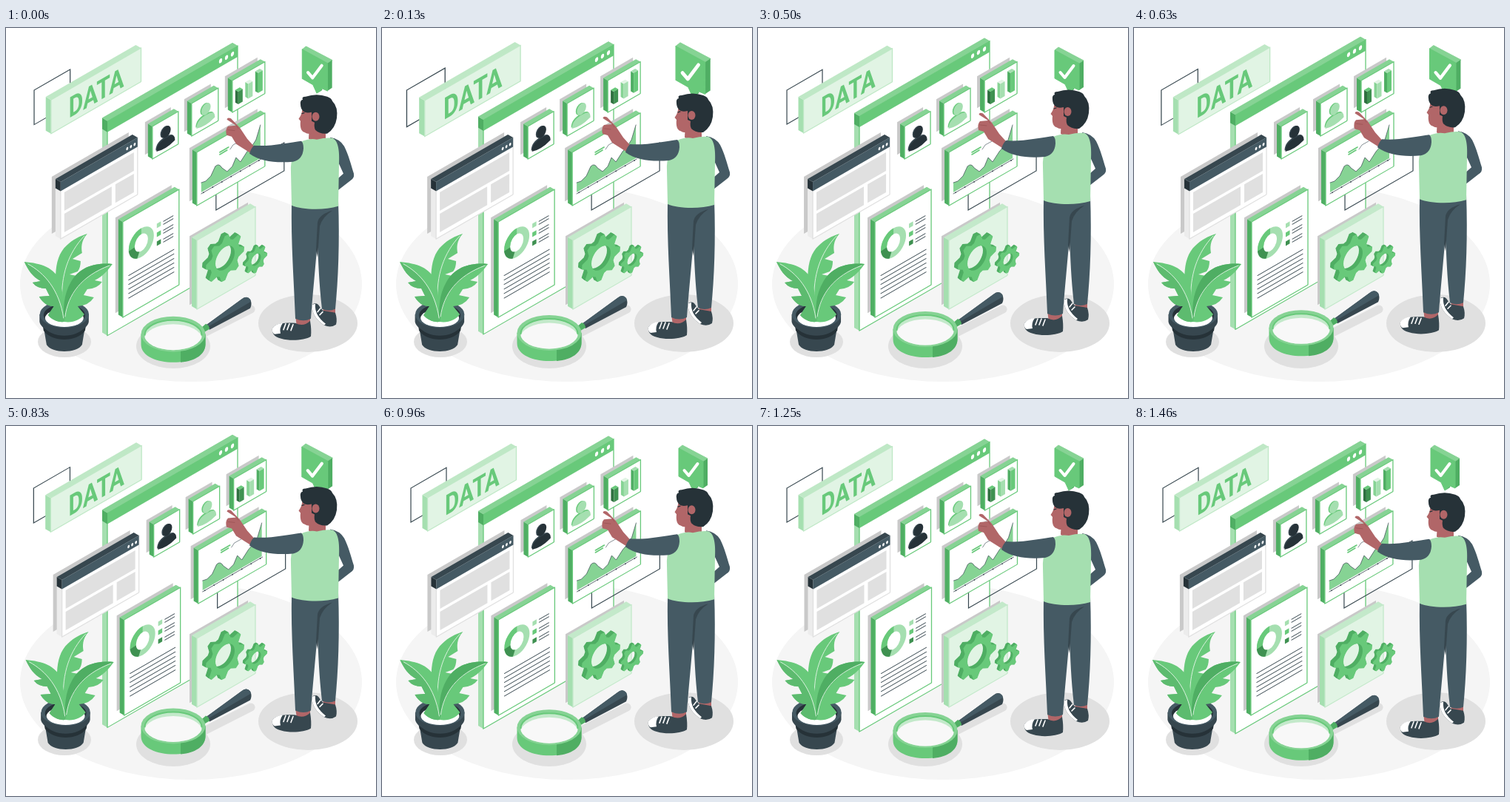
An HTML page for the animation above (1500 ms loop, 500 by 500 pixels).

```html
<!DOCTYPE html>
<html>
<head>
<meta charset="utf-8">
<style>
html, body { margin: 0; width: 100%; height: 100%; overflow: hidden; background: #fff }
svg { display: block; width: 100vw; height: 100vh }
text { font: bold 38px Roboto, sans-serif }
</style>
</head>
<body>
<svg id="stage" viewBox="0 0 500 500"></svg>
<script>
const green = '#68c97a', light = '#a5dfb0', pale = '#e1f4e4', mid = '#86d394', deep = '#4fae63', dark = '#3f9151';
const slate = '#455a64', slate2 = '#37474f', ink = '#263238', skin = '#b16668', grey = '#e0e0e0', shade = '#c9c9c9';

const path = (d, fill, more = '') => `<path d="${d}" fill="${fill}" ${more}/>`;
const line = (d, stroke, width = 1) =>
  path(d, 'none', `stroke="${stroke}" stroke-width="${width}" stroke-linecap="round" stroke-linejoin="round"`);
const oval = (x, y, rx, ry, fill, more = '') => `<ellipse cx="${x}" cy="${y}" rx="${rx}" ry="${ry}" fill="${fill}" ${more}/>`;
const box = (x, y, w, h, fill, more = '') => `<rect x="${x}" y="${y}" width="${w}" height="${h}" fill="${fill}" ${more}/>`;
const group = (id, inner) => `<g class="${id}">${inner}</g>`;
const repeat = (n, f) => Array.from({ length: n }, (_, i) => f(i)).join('');

// Isometric wall: x stays in screen pixels, y drops along the slope.
const wall = (x, y, inner) => `<g transform="matrix(1 -.577 0 1 ${x} ${y})">${inner}</g>`;

function slab(x, y, w, h, depth, shadow, [face, side, top, edge = 'none'], inner = '') {
  const up = -1.155 * depth, far = depth + shadow;
  return wall(x, y,
    (shadow ? box(-far, -1.155 * far, w, h, shade) : '') +
    path(`M0 0L${-depth} ${up}V${up + h}L0 ${h}Z`, side) +
    path(`M0 0L${-depth} ${up}H${w - depth}L${w} 0Z`, top) +
    box(0, 0, w, h, face, `stroke="${edge}" stroke-width="1.3" stroke-linejoin="round"`) + inner);
}

const card = ['#fff', deep, mid, green];

function gear(x, y, r, hole, depth) {
  let d = '';
  for (let i = 0; i < 32; i++) {
    const a = (i + .5) * Math.PI / 16 - .11, k = i % 4 < 2 ? r : r * .76;
    d += `${i ? 'L' : 'M'}${(k * .866 * Math.cos(a)).toFixed(1)} ${(k * Math.sin(a)).toFixed(1)}`;
  }
  const hx = hole * .866;
  d += `ZM${-hx} 0A${hx} ${hole} 0 1 0 ${hx} 0A${hx} ${hole} 0 1 0 ${-hx} 0Z`;
  const layer = (o, fill) => wall(x - o, y - o * .577, path(d, fill, 'fill-rule="evenodd"'));
  return repeat(depth * 2, i => layer(depth - i / 2, deep)) + layer(0, green);
}

const bust = (x, y, front, back) => wall(x, y,
  path('M-13 0C-13-8-8-11 0-11S12-8 12-1Q0 5-13 0Z', back) +
  path('M-12 2C-12-6-7-9 1-9S13-7 13 1Q0 7-12 2Z', front) +
  oval(-.5, -18, 6.3, 7.5, back) + oval(1, -17, 6.3, 7.5, front));

const bars = repeat(3, i => {
  const h = [17, 20, 27][i], c = [[dark, '#2f7040', green], [light, mid, pale], [green, deep, light]][i];
  return slab(314 + i * 13.5, 103 - h - i * 7.6, 6, h, 4, 0, c);
});

const dots = (x, step, rx, ry) => repeat(3, i => oval(x + i * step, 7, rx, ry, '#fff'));

const board = group('board',
  wall(39, 84, box(0, 0, 48, 46, 'none', `stroke="${slate2}" stroke-width="1.2"`)) +
  slab(61.5, 97, 120, 45, 7, 0, [pale, light, '#bfe8c6', '#bfe8c6']) +
  `<text transform="matrix(.78 -.45 0 1 85 121.500)" fill="${green}">DATA</text>`);

const frame = group('float',
  slab(137, 126, 176, 290, 7, 0, ['#fff', light, light, green]) +
  slab(137, 126, 176, 15, 7, 0, [green, deep, mid], dots(153, 8, 2.2, 3)));

const windowPanel = group('shake',
  slab(74, 208, 104, 77, 7, 5, ['#fff', '#ececec', '#ececec', grey],
    box(5, 17, 94, 25, grey) + box(5, 46, 64, 25, grey) + box(74, 46, 25, 25, grey)) +
  slab(74, 208, 104, 12.5, 7, 0, [slate, ink, slate2], dots(90, 5, 1.4, 2)));

const ring = (d, c) => path(d, 'none', `stroke="${c}" stroke-width="8"`);
const sheet = group('shake', slab(158, 262, 76, 129, 6, 4, card,
  oval(25, 42.5, 13, 15.5, 'none', `stroke="${light}" stroke-width="8"`) +
  ring('M25 27A13 15.5 0 0 0 12 42.5V46', green) + ring('M12 44A13 15.5 0 0 0 21 57', dark) +
  repeat(3, i => box(46, 29 + i * 12, 5.5, 6, [light, green, dark][i]) +
    line(`M55 ${31 + i * 12}h13M55 ${35 + i * 12}h13`, slate2, .9)) +
  repeat(6, i => line(`M8 ${77 + i * 6.1}H69`, slate2, 1))));

const curve = 'M264 209L270 207L277 200L283 187Q288 182 292 189L299 194L306 187L311 175L317 181L326 167L333 159L338 151L344 131';
const chart = group('shake',
  wall(284, 208, box(0, 0, 92, 38, 'none', `stroke="${slate2}" stroke-width="1.2"`)) +
  slab(258, 168, 92, 72, 6, 4, card) +
  path(curve + 'V176L264 222Z', mid) + line(curve, slate2, .7) +
  line('M264 224L345 177', slate2, .8) + repeat(7, i => oval(267 + i * 12.5, 222.3 - i * 7.2, .9, .9, slate2)) +
  line('M289 168L301 161M289 171L299 165', green, 1.6) + line('M303 164L307 158L316 153', slate2, .6));

const tiles = group('shake',
  slab(198, 133, 35, 44, 6, 4, card) + bust(215.5, 158, ink, slate2) +
  slab(251, 102, 36, 44, 6, 4, card) + bust(269.5, 127, light, green) +
  slab(306, 71, 44, 43, 6, 4, card) + bars);

const gears = slab(258, 287, 79, 93, 7, 3, [pale, light, '#c3e9ca', '#c3e9ca']) +
  gear(296, 311, 30, 15, 5) + gear(338, 313, 17.5, 7.5, 3);

const plant = group('shake',
  path('M50 398L55 428C62 440 96 440 103 428L108 398Z', slate2) +
  path('M50 403C62 420 96 420 108 403L107 409C96 425 62 425 51 409Z', ink) +
  path('M45.5 387V397C50 418 108 418 112 397V387Z', slate2) +
  oval(79, 387, 33.2, 18, slate) + oval(79, 388, 28, 14.5, ink) + oval(79, 392, 26, 12, '#fff') +
  path('M73 385C66 350 62 312 82 294C90 286 100 281 110 278C101 288 102 298 103 304L90 312L101 315Q101 324 97 329L86 333L96 335Q94 343 88 348L80 390Z', green) +
  line('M76 370C74 335 84 304 106 281', '#d9f1dd', 1) +
  path('M25 316C48 318 66 324 73 342C78 358 78 378 79 397C70 398 62 394 57 388L65 376C57 376 50 372 45 363L59 362L54 352Q42 352 36 344L47 342C36 336 30 327 25 316Z', green) +
  path('M25 316C50 330 72 350 79 397C70 398 62 394 57 388L65 376C57 376 50 372 45 363L59 362L54 352Q42 352 36 344L47 342C36 336 30 327 25 316Z', '#5dbb6f') +
  path('M144 319C122 317 100 322 88 343C78 360 77 380 79 397C90 399 101 394 106 387L97 376Q112 375 119 364L105 361L110 353Q124 352 130 343L120 341C132 335 138 327 144 319Z', green) +
  path('M144 319C122 317 100 322 88 343C78 360 77 380 79 397C82 365 100 335 144 319Z', deep) +
  line('M30 319C52 331 72 353 78 392M80 390C84 360 102 335 140 321', '#d9f1dd', 1));

const magnifier = group('float',
  path('M270 402L318 367Q325 361 330 367Q333 373 330 379L275 408Z', slate2) +
  path('M270 402L318 367Q325 361 330 367L331 370L273 404Z', slate) +
  path('M262 407L270 400Q275 402 275 407L265 413Z', deep) +
  path('M182.5 414V428C183 460 269 460 269.5 428V414Z', green) +
  path('M236 436V452C257 450 269 441 269.5 428V414Z', deep) +
  oval(226, 414, 43.5, 24, mid) + oval(226, 415, 39, 20.5, '#c3e9ca') +
  `<clipPath id="lens">${oval(226, 415, 39, 20.5, '#fff')}</clipPath>` +
  oval(226, 421, 39, 20.5, '#f8f8f8', 'clip-path="url(#lens)"') +
  line('M187.500 415A38.500 20 0 0 1 264.500 415', green, 2));

const person = group('float',
  // shoes and ankles
  path('M427 374L445 377V386L430 388Z', skin) +
  path('M428 382L445 385Q448 394 446 401Q439 406 430 402C421 396 412 386 414 374Q420 370 424 377Z', slate2) +
  path('M414 374C412 386 421 396 430 402L432 400C422 392 417 384 418 373Z', '#fff') +
  line('M421 384L425 379M424 388L428 384', '#fff', 1.6) +
  path('M391 388H411V402L393 405Z', skin) +
  path('M391 399Q402 405 411 396Q413 408 412 417C404 422 385 424 372 420C362 418 359 412 360 406C366 398 380 399 391 399Z', slate2) +
  path('M374 399Q364 400 360 406Q359 412 363 414L371 413Q369 406 374 399Z', '#fff') +
  line('M375 408L378 400M380 408L383 400M385 409L388 401', '#fff', 1.6) +
  // trousers
  path('M386 236L449 234C451 290 449 340 445 380Q436 384 427 380C423 345 422 315 421 288C418 325 414 365 412 393Q402 398 391 393C389 340 385 290 386 236Z', slate) +
  path('M441 247Q423 252 421 263L419 300L421 310L424 268Q428 255 441 247Z', slate2) +
  // far arm, neck, vest
  path('M438 148Q451 150 457 160C463 172 466 184 470 197Q471 203 466 206L448 220L447 205L456 197L446 175Z', slate) +
  path('M410 130H432V152Q420 156 409 150Z', skin) +
  path('M399 154Q410 149 420 151Q432 148 441 149C449 152 451 166 450 185L449 241C430 247 400 246 386 240L385 195C384 178 390 165 399 154Z', light) +
  // pointing arm
  path('M335 160L326 150L316 135L304 122.500Q299 120.500 298.500 124L311 132L300 133Q296 137 298 145L305 147L311 157L330 169Z', skin) +
  line('M300 138L309 139M311 132L314 136', '#9a5355', .8) +
  path('M399 153C384 155 355 161 335 159Q331 163 329 170C344 181 366 183 388 181Q401 178 402 163Q402 155 399 153Z', slate) +
  // head
  path('M401 106C400 113 400 117 395.500 123L398 126C397 134 399 140 403 141Q409 145 416 142L424 134V104Z', skin) +
  line('M400 116L403 115', ink, 1.2) +
  path('M402 113Q398 109 398 104Q397 98 401 97Q399 93 405 93Q420 88 434 93Q440 95 441 99Q449 107 447 122Q445 136 434 143Q424 144 418 138Q416 134 417 128L413 126L413 114Q406 116 402 113Z', ink) +
  oval(418.5, 120, 5, 6, skin));

const bubble = group('bubble',
  path('M401 30L406 26L440 44L434 49Z', mid, `stroke="${mid}" stroke-linejoin="round"`) +
  path('M434 48L440 44V80L434 84Z', deep) + path('M421 87L427 83V79Z', deep) +
  path('M401 30L434 48V84L427 81L420 87L415 76L401 68Z', green, `stroke="${green}" stroke-linejoin="round"`) +
  line('M408.500 60L414.500 67L426.500 51', '#fff', 4));

const stage = document.getElementById('stage');
stage.innerHTML =
  oval(250, 346, 231, 132, '#f5f5f5') +
  oval(79, 424, 36, 21, grey) + oval(226, 430, 50, 30, grey) + line('M268 412L331 380', grey, 11) +
  oval(408, 399, 67, 39, grey) +
  board + frame + windowPanel + tiles + chart + sheet + gears + plant + magnifier + bubble + person;

// Linear interpolation through [position, value] keys.
function keyed(keys, p) {
  const i = keys.findIndex(k => k[0] >= p);
  if (i < 1) return keys[0][1];
  const [a, u] = keys[i - 1], [b, v] = keys[i];
  return u + (v - u) * (p - a) / (b - a);
}
const shakeKeys = [0, -1, 2, -4, 4, -4, 4, -4, 2, -1, 0].map((v, i) => [i / 10, v]);
const beatKeys = [[0, 0], [.1, 1], [.3, 0], [.4, 0], [.5, 1], [.6, 0], [1, 0]];

const move = (name, transform) =>
  stage.querySelectorAll('.' + name).forEach(el => el.setAttribute('transform', transform));
const zoom = (x, y, k) => `translate(${x} ${y}) scale(${k}) translate(${-x} ${-y})`;

function draw() {
  const p = (performance.now() + 25) / 1500 % 1, beat = keyed(beatKeys, p);
  move('float', `translate(0 ${-10 * (1 - Math.abs(2 * p - 1))})`);
  move('shake', `translate(${keyed(shakeKeys, p)} 0)`);
  move('board', zoom(110, 84, 1 + .08 * beat));
  move('bubble', zoom(421, 57, 1 + .2 * beat));
  requestAnimationFrame(draw);
}
draw();
</script>
</body>
</html>
```
